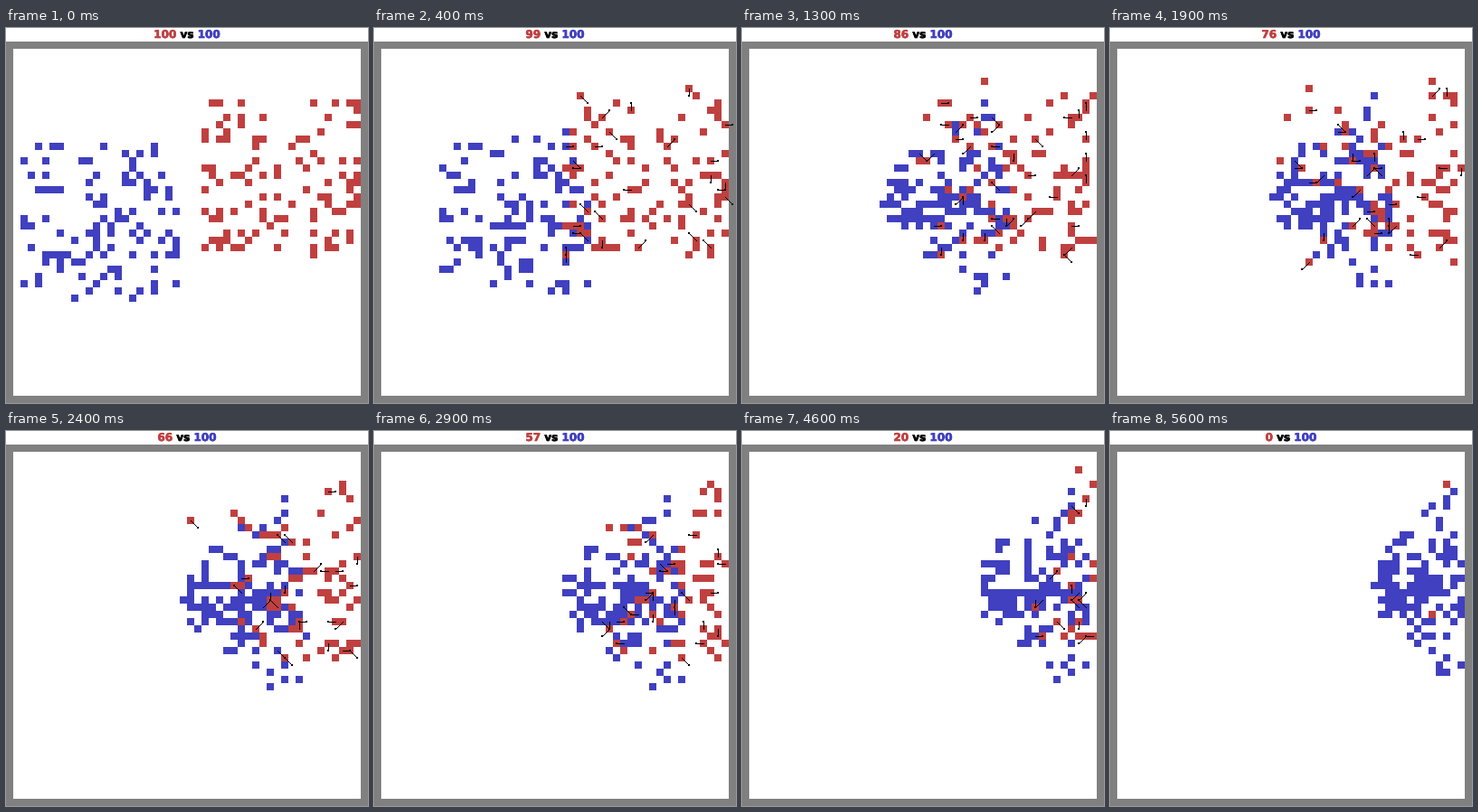
Recreate the animation shown at these times as a matplotlib script. Size 400x415 px, loop 5.7 s.

```python
import numpy as np
import matplotlib.pyplot as plt
from matplotlib.animation import FuncAnimation
from matplotlib.patheffects import withStroke

W, H, DPI = 400, 415, 64
CELL, GRID, LEFT, TOP = 8, 48, 8, 23
FRAMES, INTERVAL, SOLDIERS = 57, 100, 100
RED, BLUE, GRAY = (192, 64, 64), (64, 64, 192), (128, 128, 128)
DIRS = [(dx, dy) for dx in (-1, 0, 1) for dy in (-1, 0, 1) if dx or dy]
NEARBY = sorted(((dx, dy) for dx in range(-6, 7) for dy in range(-6, 7)),
                key=lambda d: d[0] ** 2 + d[1] ** 2)

# Key points of the battle: red survivors, last and first column of blue
TIMES = [0, 4, 13, 19, 29, 46, 56]
SCORE = [100, 99, 86, 76, 57, 20, 0]
REAR = [1, 8, 19, 22, 26, 32, 36]
FRONT = [22, 28, 35, 37, 41, 46, 47]

rng = np.random.default_rng(7)


def score(t):
    return int(round(np.interp(t, TIMES, SCORE)))


def square(side=22):
    """Random distinct cells of a square, as two coordinate arrays."""
    rows, cols = np.divmod(rng.choice(side * side, SOLDIERS, replace=False), side)
    return cols.astype(float), rows.astype(float)


# Red wanders around its home; the soldiers closest to blue tend to fall first
cols, rows = square()
steps = rng.normal(0, 0.5, (FRAMES, 2, SOLDIERS))
steps[0] = 0
red_paths = np.array([26 + cols, 7 + rows]) + steps.cumsum(0)
red_paths[:, 0] = GRID - 1 - abs(GRID - 1 - red_paths[:, 0])
last_to_fall = np.argsort(-cols - rng.uniform(0, 8, SOLDIERS))

# Blue marches as a square that closes into a wedge
cols, rows = square()
depth, flank = cols / 21, rows / 10.5 - 1


def red_at(t):
    alive = last_to_fall[:score(max(t - 1, 0))]
    return red_paths[t][:, alive].T


def blue_at(t):
    rear, front = np.interp(t, TIMES, REAR), np.interp(t, TIMES, FRONT)
    s = min(t / 13, 1)
    s = s * s * (3 - 2 * s)
    middle = np.interp(t, [0, 13, 56], [23.5, 20.5, 18])
    half = 10.5 + s * (11 * depth - 6.5)
    x = rear + (front - rear) * depth
    y = middle + half * flank * abs(flank) ** (0.4 * s)
    jitter = rng.normal(0, 0.3, (SOLDIERS, 2)) * (t > 0)
    return np.column_stack([x, y]) + jitter


def settle(points, taken):
    """Put each point on the nearest free cell."""
    cells = []
    for x, y in np.clip(np.rint(points), 0, GRID - 1).astype(int):
        for dx, dy in NEARBY:
            c = (int(x + dx), int(y + dy))
            if c not in taken and 0 <= min(c) and max(c) < GRID:
                taken.add(c)
                cells.append(c)
                break
    return cells


def attacks(reds, blues, t):
    if t == 0:
        return []
    hits = []
    if score(t):
        hits = [(c, DIRS[rng.integers(8)]) for c in reds if rng.random() < 0.27]
    foes = set(reds)
    for x, y in blues:
        near = [d for d in DIRS if (x + d[0], y + d[1]) in foes]
        if near and rng.random() < 0.25:
            hits.append(((x, y), near[rng.integers(len(near))]))
    return hits


battle = []
for t in range(FRAMES):
    taken = set()
    reds = settle(red_at(t), taken)
    blues = settle(blue_at(t), taken)
    battle.append((reds, blues, attacks(reds, blues, t)))


def paint(t):
    img = np.full((H, W, 3), 255, np.uint8)
    img[TOP - CELL:] = GRAY
    img[TOP:TOP + GRID * CELL, LEFT:LEFT + GRID * CELL] = 255
    reds, blues, hits = battle[t]
    for cells, color in ((reds, RED), (blues, BLUE)):
        for c, r in cells:
            x, y = LEFT + c * CELL, TOP + r * CELL
            img[y:y + CELL, x:x + CELL] = color
    for (c, r), (dx, dy) in hits:
        x, y = LEFT + c * CELL + CELL // 2, TOP + r * CELL + CELL // 2
        for k in range(CELL + 1):
            img[y + dy * k, x + dx * k] = 0
        x, y = x + dx * CELL, y + dy * CELL
        img[y - 1:y + 1, x - 1:x + 1] = 0
    return img


fig = plt.figure(figsize=(W / DPI, H / DPI), dpi=DPI)
ax = fig.add_axes([0, 0, 1, 1])
ax.axis("off")
field = ax.imshow(paint(0), extent=(0, W, H, 0), aspect="auto", interpolation="nearest")

# Advance widths of the bold title font
SIZE = 12
DIGIT, SPACE, VERSUS = 0.696 * SIZE, 0.348 * SIZE, 1.247 * SIZE


def label(text, color):
    color = np.array(color) / 255
    return ax.text(0, 11, text, color=color, family="DejaVu Sans", weight="bold",
                   size=SIZE * 72 / DPI, ha="left", va="baseline",
                   path_effects=[withStroke(linewidth=0.7, foreground=color)])


red_text, versus, blue_text = label("100", RED), label("vs", (0, 0, 0)), label("100", BLUE)


def update(t):
    field.set_data(paint(t))
    left = str(score(t))
    red_w = len(left) * DIGIT
    x = (W - red_w - VERSUS - 2 * SPACE - 3 * DIGIT) / 2
    red_text.set_text(left)
    red_text.set_x(x)
    versus.set_x(x + red_w + SPACE)
    blue_text.set_x(x + red_w + VERSUS + 2 * SPACE)
    return field, red_text, versus, blue_text


anim = FuncAnimation(fig, update, frames=FRAMES, interval=INTERVAL,
                     repeat=True, repeat_delay=0, blit=False)
plt.show()
```
